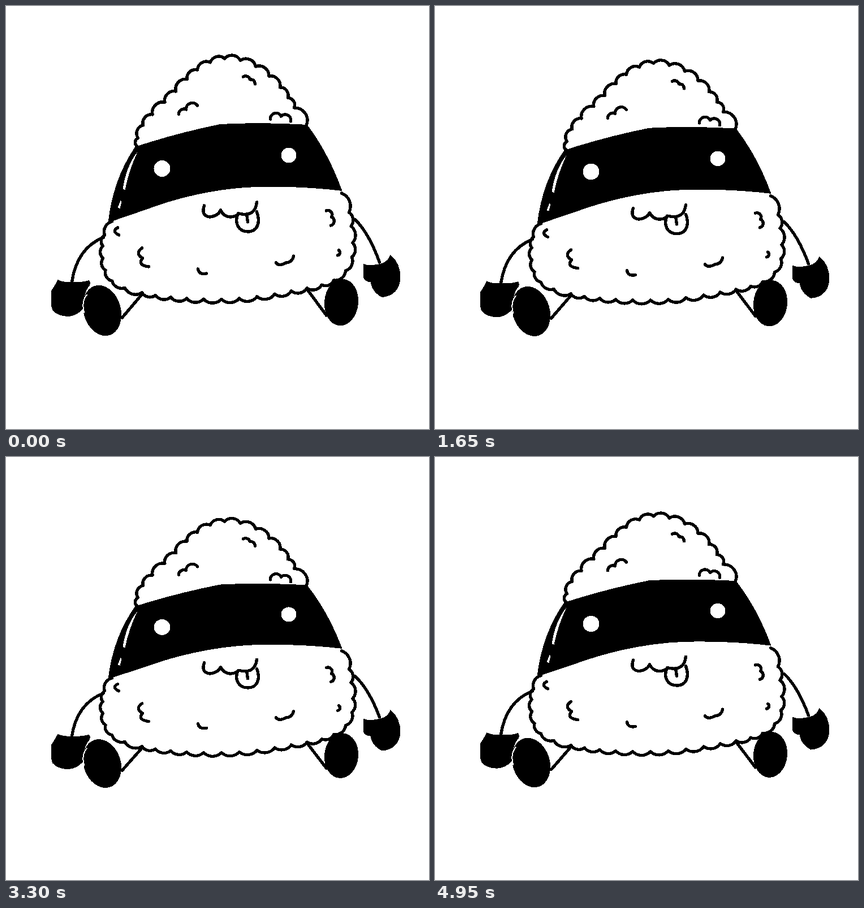
An HTML page that plays this animation: 748x748 px, repeating every 5.1 s.

```html
<!DOCTYPE html>
<html lang="en">
<head>
<meta charset="utf-8">
<title>Bouncing rice ball</title>
<style>
html, body { margin: 0; width: 100%; height: 100%; overflow: hidden; background: #fff; }
svg { display: block; width: 100%; height: 100%; }
.line { fill: none; stroke: #000; stroke-width: 5.4; stroke-linecap: round; stroke-linejoin: round; }
.white { fill: #fff; }
</style>
</head>
<body>
<svg viewBox="0 0 748 748" shape-rendering="crispEdges">
  <g id="figure">
    <g class="line">
      <path id="crown"/>
      <path id="belly"/>
      <!-- arms, legs -->
      <path d="M172 409Q125 428 116 488M617 378Q641 401 660 453"/>
      <path d="M239 511L205 551M532 501L566 547"/>
      <!-- mouth, tongue -->
      <path d="M350 353Q344 371 360 373Q375 371 379 361Q385 373 397 373Q405 373 411 367Q440 374 443 347"/>
      <path d="M410 367C402 385 412 399 427 399C444 399 450 383 443 364M425 368L427 382"/>
      <!-- grains of rice -->
      <path d="M419 125A8 8 0 0 1 431 130Q439 129 440 138"/>
      <path d="M305 191A9 9 0 0 1 318 183A11 11 0 0 1 338 176"/>
      <path d="M467 200A10 10 0 0 1 486 195A10 10 0 0 1 503 204"/>
      <path d="M566 362A7.5 7.5 0 0 1 575 373A8 8 0 0 1 574 388"/>
      <path d="M588 432A5 5 0 0 1 586 441"/>
      <path d="M477 454Q482 461 495 454Q506 453 508 442"/>
      <path d="M339 465Q341 476 354 473"/>
      <path d="M240 428Q227 437 241 446Q231 458 252 461"/>
      <path d="M197 392Q186 398 199 405"/>
    </g>
    <!-- seaweed band, shine, eyes -->
    <path d="M228 249Q300 225 378 209Q450 205 532 210Q570 260 594 327Q520 318 440 320C360 323 290 344 250 359L180 383C186 330 203 285 228 249Z"/>
    <path class="white" d="M232 258Q212 283 206 324L210 325Q217 290 232 258ZM202 344L197 357L201 358L204 346Z"/>
    <circle class="white" cx="275.5" cy="287.5" r="14.5"/>
    <circle class="white" cx="499.5" cy="264" r="13.5"/>
    <!-- hands, feet -->
    <path d="M91 484Q100 489 117 488Q135 489 146 485Q150 488 147 495Q137 505 136 535Q124 549 108 549Q90 548 82 538Q79 532 79 520L80 503Q85 496 91 484Z"/>
    <ellipse cx="169.5" cy="538.5" rx="33" ry="45.5" transform="rotate(-16 169.5 538.5)"/>
    <path d="M143 510Q132 522 138 543" fill="none" stroke="#fff" stroke-width="2"/>
    <ellipse cx="592.5" cy="524" rx="30" ry="41.5" transform="rotate(5 592.5 524)"/>
    <path d="M632 456Q640 460 655 457Q674 455 679 440C692 449 697 465 697 481C696 503 682 514 664 515Q647 506 644 488Q634 488 631 479Z"/>
  </g>
</svg>
<script>
const STEP = 150, LOOP = 5100;
const BREATH = 900, LEAP = 3150, PEAK = 3600, LANDED = 4200, PUFF = 3900;
const HIGH = 84, LOW = 119, LEAP_TOP = 65, END_TOP = 96;
const FLOOR = 629, CENTER = 425;
const figure = document.getElementById('figure');

// Point between b and c on a smooth curve through a, b, c, d.
const spline = (a, b, c, d, t) => [0, 1].map(k =>
  b[k] + t / 2 * (c[k] - a[k] + t * (2 * a[k] - 5 * b[k] + 4 * c[k] - d[k]
    + t * (3 * (b[k] - c[k]) + d[k] - a[k]))));

// Clockwise outline whose outward bumps fill each stretch between key points.
function scallops(id, bumpSize, roundness, keys) {
  const key = i => keys[Math.max(0, Math.min(keys.length - 1, i))];
  const distance = (p, q) => Math.hypot(q[0] - p[0], q[1] - p[1]);
  let last = keys[0];
  let d = `M${last}`;
  for (let i = 0; i < keys.length - 1; i++) {
    const count = Math.max(1, Math.round(distance(key(i), key(i + 1)) / bumpSize));
    for (let n = 1; n <= count; n++) {
      const next = spline(key(i - 1), key(i), key(i + 1), key(i + 2), n / count);
      const r = roundness * distance(last, next);
      d += `A${r} ${r} 0 0 1 ${next}`;
      last = next;
    }
  }
  document.getElementById(id).setAttribute('d', d);
}

scallops('crown', 25, .6, [[231, 248], [242, 211], [300, 151], [338, 113], [386, 93],
  [441, 107], [484, 144], [509, 180], [531, 210]]);
scallops('belly', 27, .68, [[593, 331], [606, 365], [611, 444], [579, 485], [504, 504],
  [412, 517], [319, 517], [240, 507], [187, 486], [171, 446], [174, 405], [187, 381]]);

function ease(from, to, progress) {
  const p = Math.min(1, progress);
  return from + (to - from) * (1 - Math.cos(Math.PI * p)) / 2;
}

// Breathing, then one tall stretch that settles.
function topAt(time) {
  if (time <= LEAP) return ease(HIGH, LOW, 1 - Math.abs(1 - time % BREATH / (BREATH / 2)));
  if (time < PEAK) return ease(LOW, LEAP_TOP, (time - LEAP) / (PEAK - LEAP));
  return ease(LEAP_TOP, END_TOP, (time - PEAK) / (LANDED - PEAK));
}

// Sideways puff after the stretch.
function widthAt(time) {
  const progress = Math.max(0, time - PUFF) / (LOOP - STEP - PUFF);
  return 1 + .049 * Math.sin(Math.PI * Math.min(1, progress)) ** 2;
}

function draw(elapsed) {
  const time = Math.floor(elapsed % LOOP / STEP) * STEP;
  const height = (FLOOR - topAt(time)) / (FLOOR - HIGH);
  figure.setAttribute('transform',
    `translate(${CENTER + .5} ${FLOOR}) scale(${widthAt(time)} ${height}) translate(${-CENTER} ${-FLOOR})`);
}

const start = performance.now();
function tick() {
  draw(performance.now() - start);
  requestAnimationFrame(tick);
}
tick();
</script>
</body>
</html>
```
